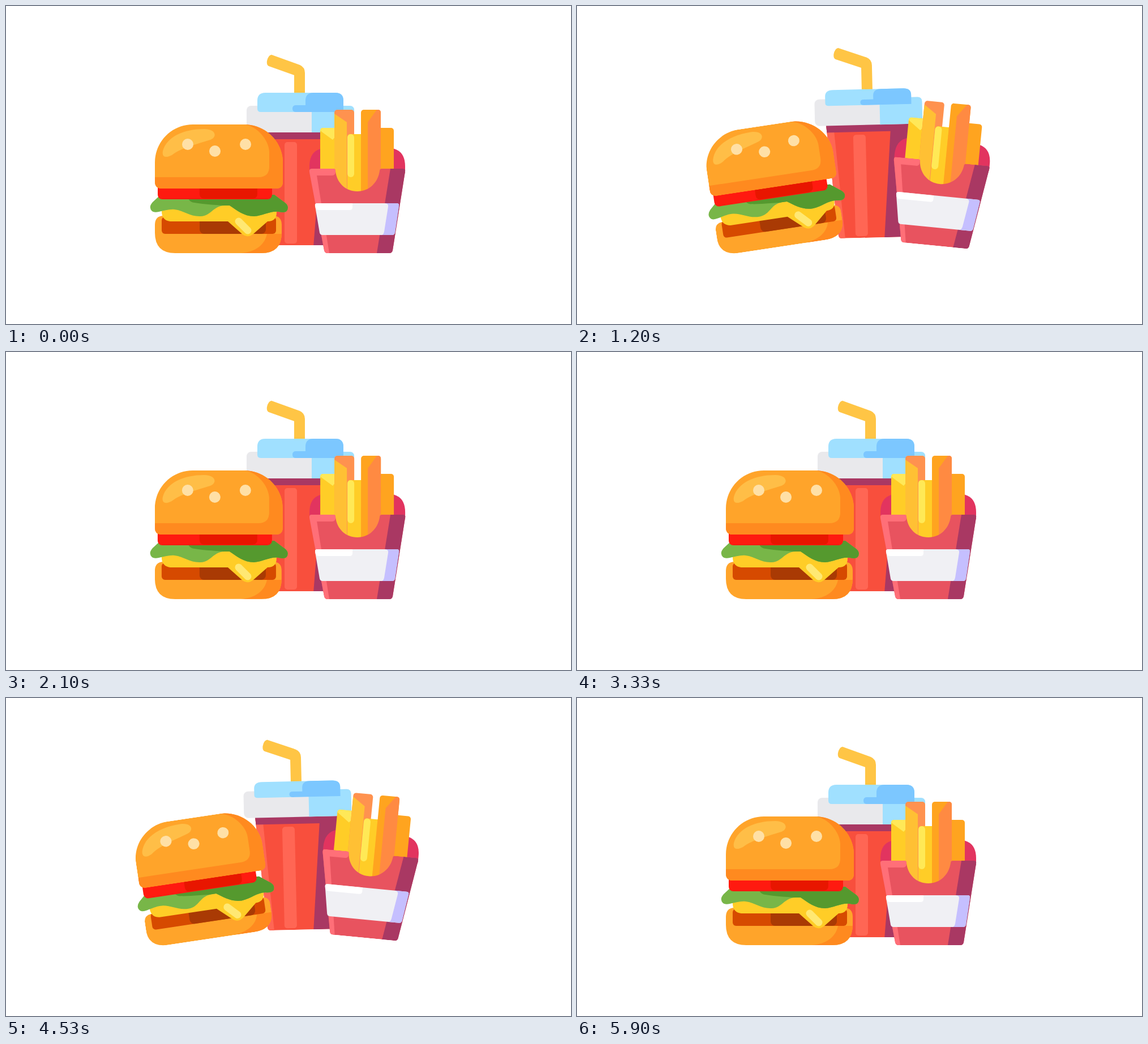
An HTML page that plays this animation: 998 by 561 pixels, repeating every 6.03 s.

```html
<!DOCTYPE html>
<html lang="en">
<head>
<meta charset="utf-8">
<title>Fast food</title>
<style>
html, body { margin: 0; width: 100%; height: 100%; overflow: hidden; background: #fff; }
svg { display: block; width: 100vw; height: 100vh; }
</style>
</head>
<body>
<svg viewBox="0 0 998 561">
  <defs>
    <clipPath id="cupClip"><path d="M444 215H598L580 417Q579 422 574 422H467Q463 422 462 417Z"/></clipPath>
    <clipPath id="bunClip"><path d="M263 310V276C263 239 293 209 330 209H421C458 209 489 239 489 276V310Q489 322 477 322H275Q263 322 263 310Z"/></clipPath>
    <clipPath id="baseClip"><path d="M263 386Q263 370 279 370H471Q487 370 487 386V400Q487 436 451 436H299Q263 436 263 400Z"/></clipPath>
    <clipPath id="leafClip"><path d="M272 334L259 346Q251 355 258 362Q262 365 270 363C280 361 288 358 298 359C315 361 325 372 344 371C363 370 365 353 386 352H395C407 360 420 371 438 371C455 370 466 361 482 363Q498 367 498 355Q497 349 490 345L474 333Z"/></clipPath>
    <clipPath id="boxClip"><path d="M540 287H578Q582 287 582 291C584 312 600 327 620.500 327C641 327 657 312 660 291Q660 287 664 287H701Q706 287 705 292L683 431Q682 436 677 436H568Q563 436 562 431L536 293Q535 287 540 287Z"/></clipPath>
  </defs>

  <g id="drink">
    <path id="straw" fill="#ffc545" d="M469 86L519 104Q528 108 528 118V205H509V122L464 106Q460 104 461 97Q463 87 469 86Z"/>
    <g clip-path="url(#cupClip)">
      <path fill="#f84f3d" d="M440 215H600V425H440Z"/>
      <path fill="#ff6654" d="M440 215H457L474 425H440Z"/>
      <path fill="#a93863" d="M440 215H600V425H543L558 235H440Z"/>
    </g>
    <rect x="492" y="240" width="22" height="179" rx="5" fill="#ff6654"/>
    <rect x="425" y="176" width="190" height="47" rx="8" fill="#e9e9ec"/>
    <path fill="#a0e0ff" d="M540 176H607Q615 176 615 184V215Q615 223 607 223H540Z"/>
    <g id="lid">
      <path fill="#a0e0ff" d="M444 167Q444 153 458 153H582Q596 153 596 167V187H450Q444 187 444 181Z"/>
      <path fill="#7cc7ff" d="M529 175V167Q529 153 543 153H582Q596 153 596 167V187H512Q506 187 506 181T512 175Z"/>
    </g>
  </g>

  <g id="burger">
    <g id="base" clip-path="url(#baseClip)">
      <path fill="#ffa42a" d="M263 370H487V436H263Z"/>
      <path fill="#ff8a1f" d="M461 402H487V436H415C440 434 457 422 461 402Z"/>
    </g>
    <g class="layer">
      <rect x="275" y="372" width="202" height="30" rx="6" fill="#d64a00"/>
      <rect x="342" y="372" width="117" height="30" rx="8" fill="#a93a04"/>
    </g>
    <g class="layer">
      <path fill="#ffcd27" d="M275 350H478V364Q478 380 462 380L437 402Q427 410 418 403L392 380H290Q275 378 275 362Z"/>
      <path d="M411 380L427 396" stroke="#ffe873" stroke-width="13" stroke-linecap="round"/>
    </g>
    <g class="layer"><g clip-path="url(#leafClip)">
      <path fill="#78b648" d="M250 330H500V375H250Z"/>
      <path fill="#55992e" d="M320 330H500V375H400L395 353C375 351 350 350 333 347Q326 347 322 340Z"/>
    </g></g>
    <g class="layer">
      <rect x="268" y="310" width="202" height="31" rx="8" fill="#ff1a10"/>
      <rect x="342" y="310" width="102" height="30" rx="8" fill="#e81600"/>
    </g>
    <g class="layer"><g id="bun">
      <g clip-path="url(#bunClip)">
        <path fill="#ffa42a" d="M263 209H489V322H263Z"/>
        <path fill="#ff8a1f" d="M263 302H446Q465 302 465 283V258C465 238 445 212 421 209H489V322H263Z"/>
      </g>
      <path fill="#ffbe47" d="M277 256C284 230 315 217 350 217C372 217 373 232 361 236C330 246 310 250 293 263C282 269 275 266 277 256Z"/>
      <g fill="#ffe0a6"><circle cx="321" cy="244" r="10"/><circle cx="369" cy="256" r="10"/><circle cx="423" cy="244" r="10"/></g>
    </g></g>
  </g>

  <g id="fries">
    <path fill="#e2345f" d="M536 295V283Q536 250 569 250H672Q705 250 705 283V295Z"/>
    <g class="fry" data-x="667" data-turn="9.7">
      <rect x="649" y="215" width="36" height="140" rx="5" fill="#ffa41f"/>
    </g>
    <g class="fry" data-x="573" data-turn="-5">
      <rect x="555" y="215" width="36" height="140" rx="5" fill="#ffcd27"/>
      <path fill="#ffe858" d="M555 220Q555 215 560 215H586L591 220L577 236Z"/>
    </g>
    <g class="fry" data-x="597" data-turn="3.6">
      <rect x="580" y="183" width="35" height="190" rx="5" fill="#ff924f"/>
      <path fill="#ffc034" d="M580 190L602 205V373H580Z"/>
    </g>
    <g class="fry" data-x="621" data-turn="-3">
      <rect x="603" y="226" width="36" height="150" rx="5" fill="#ffcd27"/>
      <path fill="#ffb92d" d="M627 226H634Q639 226 639 231V376H627Z"/>
      <rect x="603" y="226" width="12" height="76" rx="6" fill="#ffe956"/>
    </g>
    <g class="fry" data-x="645" data-turn="4.5">
      <rect x="627" y="183" width="35" height="190" rx="5" fill="#ffa41f"/>
      <path fill="#ff8a42" d="M639 205L655 183H657Q662 183 662 188V373H639Z"/>
    </g>
    <g clip-path="url(#boxClip)">
      <path fill="#e8535f" d="M530 287H710V436H530Z"/>
      <path fill="#ff6f78" d="M530 287H582V292Q582 299 576 299H549L571 436H530Z"/>
      <path fill="#a93863" d="M679 287H710V436H655Z"/>
    </g>
    <path fill="#f0f0f4" d="M550 348H690Q695 348 694 353L687 400Q686 404 682 404H559Q555 404 554 400L546 353Q545 348 550 348Z"/>
    <path fill="#c5bfff" d="M670 348H690Q695 348 694 353L687 400Q686 404 682 404H664Q667 403 668 398L675 354Q676 349 670 348Z"/>
    <path fill="#fff" d="M550 348H612V355Q612 360 607 360H552Q547 360 546 353Q545 348 550 348Z"/>
  </g>
</svg>
<script>
const LOOP = 6030, REPEAT = 2940;
const get = id => document.getElementById(id);
const move = (el, m) => el.setAttribute("transform", m);
const clamp = x => Math.min(1, Math.max(0, x));
const easeOut = x => 1 - (1 - x) ** 3;
const easeInOut = x => x < .5 ? 4 * x ** 3 : 1 - 4 * (1 - x) ** 3;
// Smooth bump that rises and falls around a moment
const bump = (t, mid) => Math.cos(Math.PI / 2 * clamp(Math.abs(t - mid) / 220)) ** 2;

const layers = document.querySelectorAll(".layer");
const fries = document.querySelectorAll(".fry");

function draw(t) {
  const lean = easeOut(clamp((t - 430) / 600)) - easeInOut(clamp((t - 1500) / 670));
  const pop = bump(t, 650), drop = bump(t, 1800);

  // Burger tips over while its layers sink into each other
  const angle = 8.6 * lean, squash = lean + .3 * pop + .75 * drop;
  move(get("burger"), `translate(${-1.35 * angle} ${-.5 * lean}) rotate(${-angle} 299 436)`);
  move(get("base"), `translate(0 436) scale(1 ${1 - .11 * squash}) translate(0 -436)`);
  move(get("bun"), `translate(0 265) scale(1 ${1 - .027 * squash}) translate(0 -265)`);
  layers.forEach((el, i) => move(el, `translate(0 ${(4 + 1.5 * i) * squash})`));

  // Drink hops and sways, the straw shoots up
  const lift = 13 * lean - 2 * drop;
  const sway = 2.4 * pop + .3 * drop - 1.35 * lean;
  move(get("drink"), `translate(0 ${-lift}) rotate(${sway} 503 419)`);
  move(get("straw"), `translate(0 ${-34.5 * pop - 30 * drop})`);
  move(get("lid"), `translate(0 192) scale(1 ${1 - .014 * lift}) translate(0 -192)`);

  // Box tips the other way, fries jump out and then fan open
  const turn = 5.6 * lean - 3.4 * pop - 6.8 * drop;
  move(get("fries"), `translate(${9.5 * lean} ${-13.4 * lean}) rotate(${turn} 621 436)`);
  fries.forEach(el =>
    move(el, `translate(0 ${-18.5 * pop}) rotate(${el.dataset.turn * drop} ${el.dataset.x} 350)`));
}

function frame() {
  const t = performance.now() % LOOP;
  draw(t < 3200 ? t : t - REPEAT);
  requestAnimationFrame(frame);
}
frame();
</script>
</body>
</html>
```
